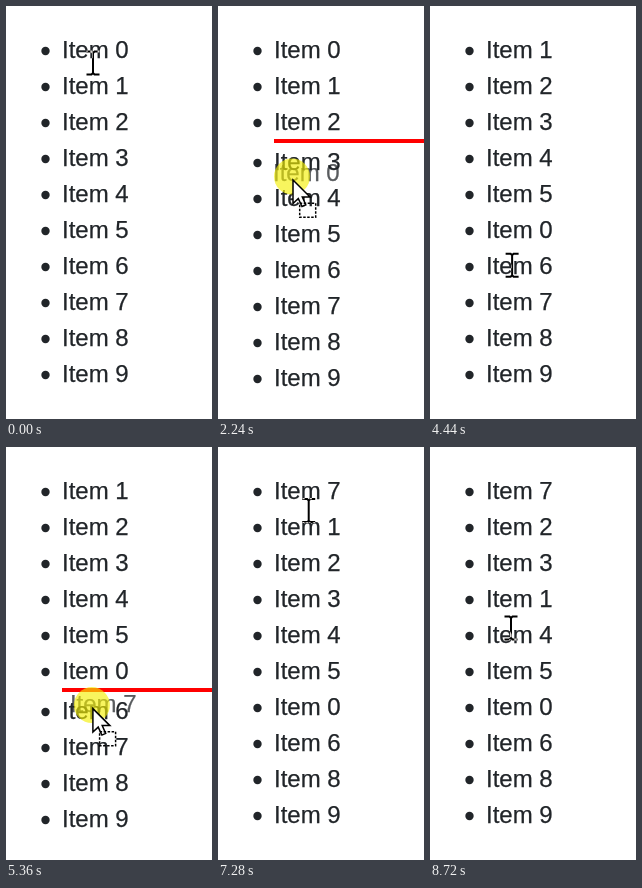
These frames come from a looping animation (206x413 px, 9.4 s). An HTML page:

```html
<!DOCTYPE html>
<html lang="en">
<head>
<meta charset="utf-8">
<title>Drag to reorder</title>
<style>
  html, body { margin: 0; width: 100%; height: 100%; overflow: hidden; background: #fff; }
  svg { display: block; width: 206px; height: 413px; }
  text { font: 24px "Liberation Sans", Arial, sans-serif; stroke: #212529; stroke-width: .25; }
  #list, #ghost { fill: #212529; }
  #ghost { opacity: .75; }
  #beam { fill: none; stroke: #fff; stroke-width: 2; mix-blend-mode: difference; }
</style>
</head>
<body>
<svg viewBox="0 0 206 413">
  <rect width="206" height="413" fill="#fff"/>
  <g id="list"></g>
  <rect id="line" x="56" width="150" height="4" fill="#f00"/>
  <text id="ghost"></text>
  <circle id="press" cx="-1" cy="-2" r="18" fill="#f4f000" fill-opacity=".63"/>
  <path id="beam" d="M-6.5-11.5h5l1.5 1.5 1.5-1.5h5M0-10.5v21M-6.5 11.5h5l1.5-1.5 1.5 1.5h5"/>
  <g id="arrow" stroke="#000">
    <path d="M0 1.5V25L5.3 20 9 28 12.8 26.3 9.3 18.5H17Z" fill="#fff" stroke-width="1.5"/>
    <rect x="6.7" y="24.7" width="16" height="14" fill="none" stroke-width="1.5" stroke-dasharray="2.5 1.5"/>
  </g>
</svg>
<script>
const LOOP = 9400, STEP = 40, TOP = 25, ROW = 36, GAP = 4;
const $ = id => document.getElementById(id);

// The pointer rests between moves; bend bows a move sideways
const home = [87, 57];
const moves = [
  { start: 240, end: 880, to: [76, 50], bend: [0, 34] },
  { start: 1200, end: 2240, to: [75, 172.5] },
  { start: 2320, end: 2960, to: [76, 244] },
  { start: 3200, end: 3320, to: [76, 250] },
  { start: 4320, end: 4960, to: [79, 299], bend: [10, 0] },
  { start: 5190, end: 6200, to: [87, 68], bend: [13, 0] },
  { start: 6240, end: 6480, to: [87, 56] },
  { start: 7240, end: 7440, to: [85, 94], bend: [7, 0] },
  { start: 7760, end: 8000, to: [79, 146] },
  { start: 8000, end: 8400, to: [81, 181] }
];

// Row "from" is dropped in front of row "to"
const drags = [
  { press: 920, start: 1200, drop: 3640, from: 0, to: 6 },
  { press: 5160, start: 5160, drop: 6680, from: 7, to: 0 },
  { press: 7640, start: 7760, drop: 8680, from: 1, to: 4 }
];

const rows = Array.from({ length: 10 }, () => {
  const row = document.createElementNS("http://www.w3.org/2000/svg", "g");
  row.innerHTML = '<circle cx="39.5" cy="20" r="4.2"/><text x="56" y="27"></text>';
  return $("list").appendChild(row);
});

function pointer(t) {
  let at = home;
  for (const { start, end, to, bend = [0, 0] } of moves) {
    if (t <= start) break;
    const f = Math.min(1, (t - start) / (end - start));
    at = at.map((v, i) => v + (to[i] - v) * f + bend[i] * Math.sin(Math.PI * f));
  }
  return at;
}

function reorder(order, { from, to }) {
  const [item] = order.splice(from, 1);
  order.splice(to > from ? to - 1 : to, 0, item);
}

const show = (id, on) => $(id).setAttribute("visibility", on ? "visible" : "hidden");
const place = (el, x, y) => el.setAttribute("transform", `translate(${x} ${y})`);

function draw(t) {
  const [x, y] = pointer(t);
  const order = [...rows.keys()];
  drags.filter(d => t >= d.drop).forEach(d => reorder(order, d));

  const active = drags.find(d => t >= d.start && t < d.drop);
  let target = -1;
  if (active) {
    const { from, to, start } = active;
    const [grabX, grabY] = pointer(start);
    const over = Math.floor((y - TOP - (to > from ? GAP : 0)) / ROW);
    if (over !== from) target = over;
    $("ghost").textContent = "Item " + order[from];
    place($("ghost"), 56 + x - grabX, TOP + ROW * from + 27 + y - grabY);
  }

  rows.forEach((row, i) => {
    row.lastChild.textContent = "Item " + order[i];
    place(row, 0, TOP + ROW * i + (target >= 0 && i >= target ? GAP : 0));
  });
  $("line").setAttribute("y", TOP + ROW * target);

  const dragging = drags.some(d => t >= d.start && t < d.drop + STEP);
  show("line", target >= 0);
  show("ghost", active);
  show("press", drags.some(d => t >= d.press && t < d.drop));
  show("arrow", dragging);
  show("beam", !dragging);
  for (const id of ["press", "arrow", "beam"]) place($(id), x, y);
}

const begin = performance.now();
function tick() {
  const t = (performance.now() - begin) % LOOP;
  draw(Math.floor(t / STEP) * STEP);
  requestAnimationFrame(tick);
}
tick();
</script>
</body>
</html>
```
